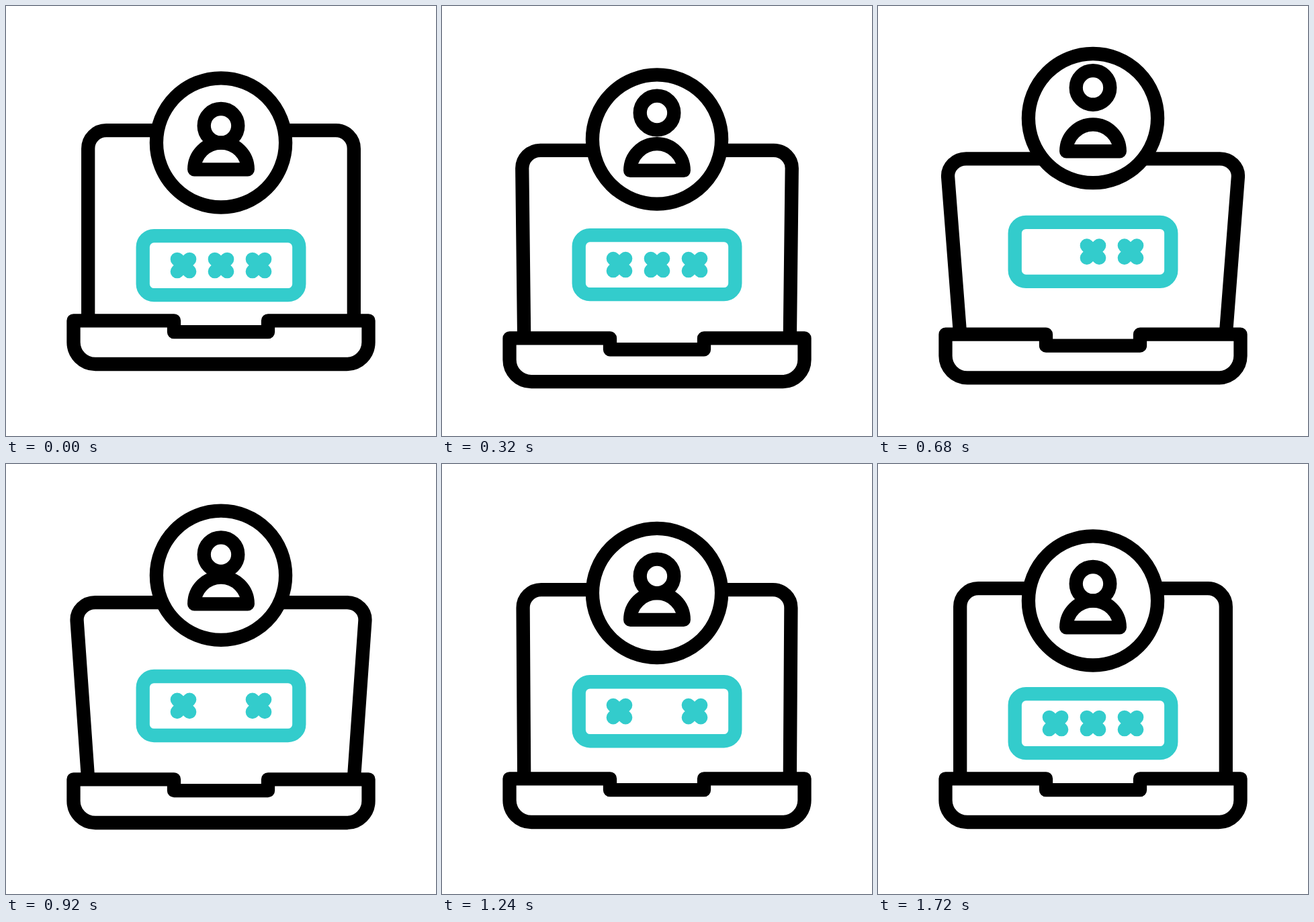
These frames come from a looping animation (640 by 640 pixels, 2.08 s). An HTML page:

```html
<!DOCTYPE html>
<html lang="en">
<head>
<meta charset="utf-8">
<title>Laptop login</title>
<style>
  html, body { margin: 0; width: 100%; height: 100%; overflow: hidden; background: #fff; }
  svg { display: block; width: 100%; height: 100%; }
  .ink { fill: none; stroke: #000; stroke-width: 20.3; stroke-linejoin: round; }
  .teal { fill: none; stroke: #3cc; stroke-width: 20.3; stroke-linecap: round; }
</style>
</head>
<body>
<svg viewBox="0 0 640 640">
  <path id="lid" class="ink"/>
  <path id="base" class="ink" d="M100.5 468.3H250V485.2H390V468.3H539.5V500.5A32.5 32.5 0 0 1 507 533H133A32.5 32.5 0 0 1 100.5 500.5Z"/>
  <g id="field" class="teal">
    <rect x="203.7" y="342.2" width="232.6" height="88" rx="16.5"/>
    <path class="star" d="M254.8 376.8l18.4 18.4m0-18.4l-18.4 18.4"/>
    <path class="star" d="M310.8 376.8l18.4 18.4m0-18.4l-18.4 18.4"/>
    <path class="star" d="M366.8 376.8l18.4 18.4m0-18.4l-18.4 18.4"/>
  </g>
  <g id="badge" class="ink">
    <circle cx="320" cy="203.4" r="96.1" style="fill:#fff"/>
    <circle id="head" cx="320" cy="178.3" r="25.3"/>
    <path id="torso" d="M280.2 243.3A39.8 39.8 0 0 1 359.8 243.3Z"/>
  </g>
</svg>
<script>
const LOOP = 2080, STEP = 40;
const $ = id => document.getElementById(id);
const stars = document.querySelectorAll('.star');

// Ease in and out between two times; bend > 1 lengthens the end, < 1 the start.
function ease(t, from, to, bend = 1) {
  const u = Math.min(1, Math.max(0, (t - from) / (to - from)));
  const v = 1 - (1 - u) ** bend;
  return v * v * (3 - 2 * v);
}

// Go out to a peak and come back.
const swing = (peak, out, back) => t => peak * ease(t, ...out) * (1 - ease(t, ...back));

const drop = swing(31.5, [0, 435], [436, 951, 0.8]);
const tilt = swing(21.8, [201, 666], [832, 1332]);
const lift = swing(38.8, [221, 866, 1.5], [838, 1329, 0.6]);
const split = swing(23.5, [83, 625, 1.5], [561, 1098]);
const rise = swing(26.2, [221, 754, 0.6], [960, 1710]);

const move = (id, y) => $(id).setAttribute('transform', `translate(0 ${y.toFixed(2)})`);

function lidPath(foot, top, flare) {
  const l = 122.2 - flare, r = 517.8 + flare, y = top + 27, lean = flare * 0.05;
  return `M122.2 ${foot}L${l} ${y}C${l - lean} ${top + 12} ${l + 12} ${top} ${l + 27} ${top}`
    + `H${r - 27}C${r - 12} ${top} ${r + lean} ${top + 12} ${r} ${y}L517.8 ${foot}`;
}

function draw(t) {
  const d = drop(t), s = tilt(t), p = split(t);
  $('lid').setAttribute('d', lidPath(468.3 + d, 185.2 + d + s, s * 0.83));
  move('base', d);
  move('field', -rise(t));
  move('badge', -lift(t));
  move('head', -p);
  move('torso', p * 0.45);
  // One star at a time is blank, 440 ms each.
  const blank = Math.floor((t - 400) / 440);
  stars.forEach((el, i) => el.setAttribute('visibility', i === blank ? 'hidden' : 'visible'));
}

const start = performance.now();
function tick() {
  const t = (performance.now() - start) % LOOP;
  draw(t < 2 * STEP ? 0 : Math.floor(t / STEP) * STEP);
  requestAnimationFrame(tick);
}
tick();
</script>
</body>
</html>
```
